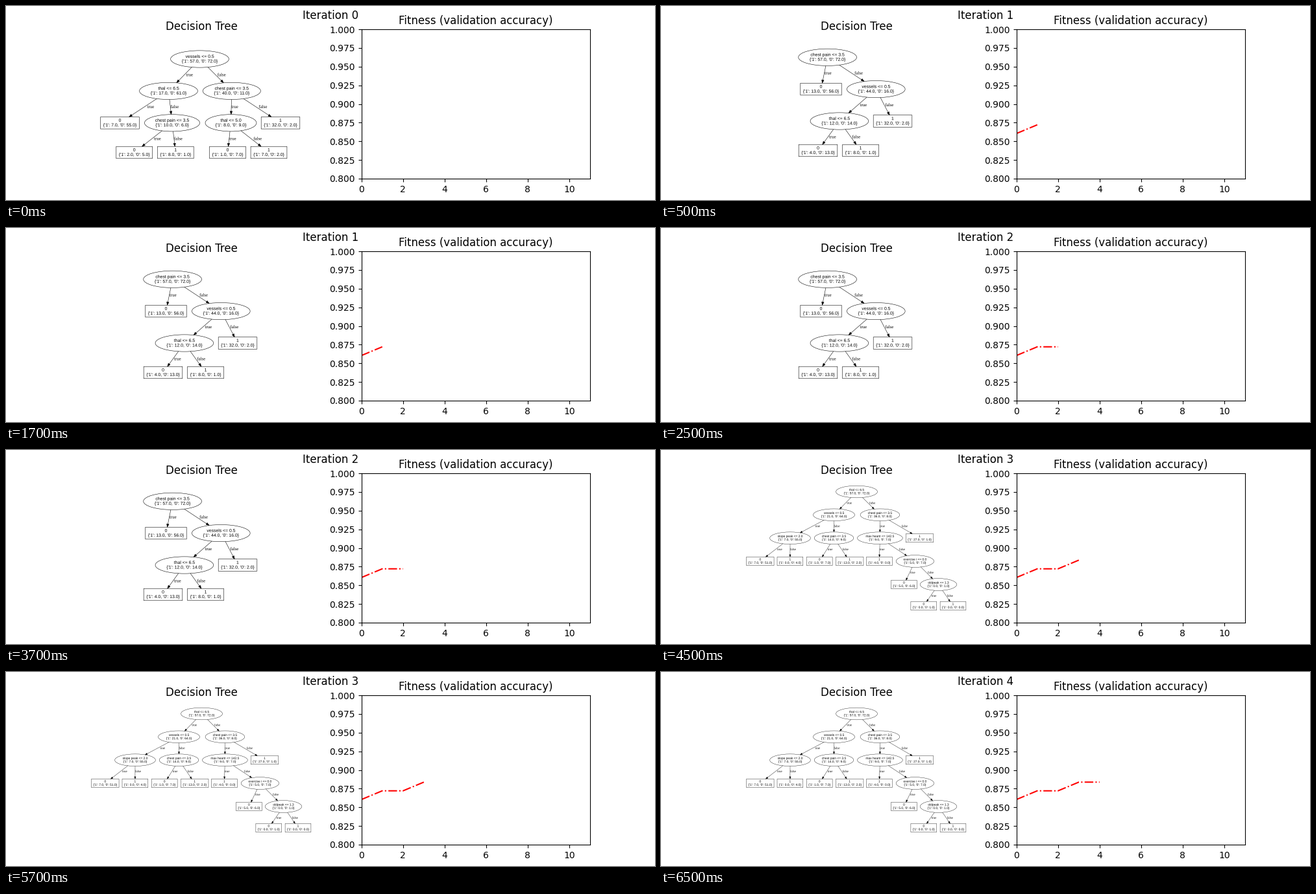
A matplotlib script for the animation above (8 s loop, 1000 by 300 pixels).

```python
import math

import matplotlib.pyplot as plt
import numpy as np
from matplotlib.animation import FuncAnimation
from matplotlib.patches import Ellipse, PathPatch, Polygon, Rectangle
from matplotlib.textpath import TextPath
from matplotlib.transforms import Affine2D

W, H, DPI = 1000, 300, 100
STEP = 500  # ms
N_STEPS = 16
SANS = {"family": "Liberation Sans"}
SERIF = {"family": "Liberation Serif"}

# Layout in points, scaled to pixels by each tree's own factor
FONT, PAD, LINE = 14, 16, 15
OVAL_H, BOX_H, LABEL_DY = 53.74, 38, 50.37

# Split: (x, test, true branch, false branch).  Leaf: (x, class, ones, zeros).
TREES = [
    (0.488, (82, 131.4, 180.8, 226.5),
     (298.5, "vessels <= 0.5",
      (250.5, "thal <= 6.5",
       (175.5, 0, 7, 55),
       (256, "chest pain <= 3.5", (197.7, 0, 2, 5), (261.3, 1, 8, 1))),
      (347.8, "chest pain <= 3.5",
       (346.5, "thal <= 5.0", (341.5, 0, 1, 7), (405, 1, 7, 2)),
       (423, 1, 32, 2)))),
    (0.488, (79.3, 128.6, 178, 223.5),
     (256.6, "chest pain <= 3.5",
      (246.5, 0, 13, 56),
      (331.3, "vessels <= 0.5",
       (274.9, "thal <= 6.5", (242, 0, 4, 13), (307.6, 1, 8, 1)),
       (357, 1, 32, 2)))),
    (0.348, (64.5, 100.3, 136.2, 172, 208, 241),
     (301.5, "thal <= 6.5",
      (266.5, "vessels <= 0.5",
       (199, "slope peak <= 2.0", (152.8, 0, 7, 51), (198.9, 1, 0, 4)),
       (266.5, "chest pain <= 3.5", (244.2, 0, 1, 7), (290.7, 1, 13, 2))),
      (337.4, "chest pain <= 3.5",
       (337.4, "max heartr <= 142.5",
        (336.4, 1, 4, 0),
        (391.4, "exercise i <= 0.0",
         (374.4, 0, 5, 6),
         (427.5, "oldpeak <= 1.3", (404.8, 0, 0, 1), (450, 1, 0, 0)))),
       (398.5, 1, 27, 1)))),
]
TREE_AT = (0, 1, 1, 2, 2)
FITNESS = np.array([74, 75, 75, 76, 76]) / 86


def is_leaf(node):
    return not isinstance(node[1], str)


def counts(node):
    """Class totals (ones, zeros) of all leaves below a node."""
    if is_leaf(node):
        return node[2:]
    return tuple(map(sum, zip(counts(node[2]), counts(node[3]))))


def node_lines(node):
    ones, zeros = counts(node)
    return str(node[1]), f"{{'1': {ones:.1f}, '0': {zeros:.1f}}}"


def text_width(text, font, size):
    return TextPath((0, 0), text, size=size, prop=font).get_extents().width


class TreeView:
    def __init__(self, ax, scale, rows, root):
        self.ax, self.s, self.rows = ax, scale, rows
        self.artists = []
        self.draw(root, 0)

    def add(self, patch):
        patch.set_clip_on(False)
        patch.set_snap(False)
        self.artists.append(self.ax.add_patch(patch))

    def text(self, x, y, text, font):
        path = TextPath((0, 0), text, size=FONT * self.s, prop=font)
        box = path.get_extents()
        move = Affine2D().translate(-(box.x0 + box.x1) / 2, 0).scale(1, -1)
        path = move.translate(x, y).transform_path(path)
        self.add(PathPatch(path, fc="black", lw=0))

    def size(self, node):
        text = max(text_width(t, SANS, FONT) for t in node_lines(node)) + 1
        if is_leaf(node):
            return (text + PAD) * self.s, BOX_H * self.s
        return (text + PAD) * math.sqrt(2) * self.s, OVAL_H * self.s

    def draw(self, node, depth):
        x, y = node[0], self.rows[depth]
        w, h = self.size(node)
        style = dict(fc="none", ec="black", lw=0.8 * self.s)
        if is_leaf(node):
            self.add(Rectangle((x - w / 2, y - h / 2), w, h, **style))
        else:
            self.add(Ellipse((x, y), w, h, **style))
        for i, line in enumerate(node_lines(node)):
            self.text(x, y + (LINE * i - 3.8) * self.s, line, SANS)
        if not is_leaf(node):
            for child, label in zip(node[2:], ("true", "false")):
                self.edge(node, child, depth, label)
                self.draw(child, depth + 1)

    def edge(self, node, child, depth, label):
        s = self.s
        a = np.array([node[0], self.rows[depth]])
        b = np.array([child[0], self.rows[depth + 1]])
        d = b - a
        start = a + d * self.clip(node, d)
        tip = b - d * self.clip(child, d)
        u = d / np.hypot(*d)
        side = np.array([-u[1], u[0]]) * 3.5 * s
        base = tip - u * 10 * s
        self.add(Polygon([start, base], closed=False, fc="none", ec="black",
                         lw=0.8 * s))
        self.add(Polygon([tip, base + side, base - side], fc="black",
                         ec="black", lw=0.8 * s))
        dy = LABEL_DY * s
        half = text_width(label, SERIF, FONT * s) / 2
        x = a[0] + d[0] * dy / d[1] + half + 0.06 * abs(d[0])
        self.text(x, a[1] + dy + 3.8 * s, label, SERIF)

    def clip(self, node, d):
        """Share of vector d that lies inside the node's outline."""
        r = np.abs(d) / (np.array(self.size(node)) / 2)
        return 1 / (r.max() if is_leaf(node) else np.hypot(*r))

    def show(self, on):
        for artist in self.artists:
            artist.set_visible(on)


fig = plt.figure(figsize=(W / DPI, H / DPI), dpi=DPI, facecolor="white")
stage = fig.add_axes([0, 0, 1, 1])
stage.set(xlim=(0, W), ylim=(H, 0))
stage.axis("off")
views = [TreeView(stage, *tree) for tree in TREES]

heading = fig.suptitle("Iteration 0")
fig.text(0.3011, 1 - 36.9 / H, "Decision Tree", size=12, ha="center",
         va="baseline")

ax = fig.add_subplot(1, 2, 2)
ax.set_title("Fitness (validation accuracy)")
ax.set(xlim=(0, 11), ylim=(0.8, 1.0), xticks=range(0, 11, 2))
curve, = ax.plot([], [], "r-.")


def update(step):
    it = (step + 3) // 4
    heading.set_text(f"Iteration {it}")
    for i, view in enumerate(views):
        view.show(i == TREE_AT[it])
    curve.set_data(np.arange(it + 1), FITNESS[:it + 1])
    return [heading, curve]


anim = FuncAnimation(fig, update, frames=N_STEPS, interval=STEP, repeat=True,
                     repeat_delay=0, blit=False)
plt.show()
```
